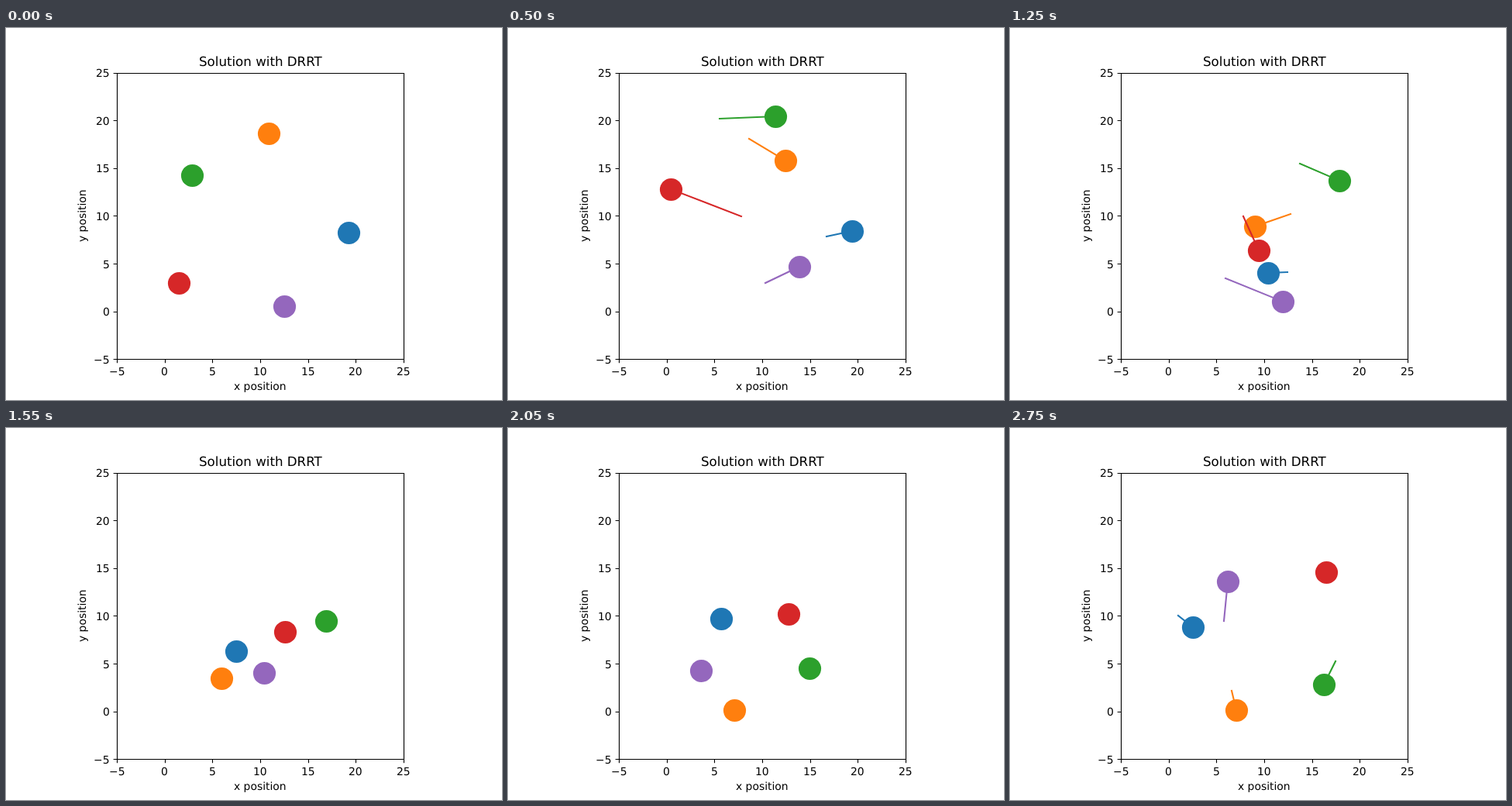
An HTML page that plays this animation: 640x480 px, repeating every 2800 ms.

```html
<!DOCTYPE html>
<html lang="en">
<head>
<meta charset="utf-8">
<title>Planned paths</title>
<style>
  html, body { margin: 0; width: 100%; height: 100%; overflow: hidden; background: #fff; }
  svg { display: block; }
  text { font-family: "DejaVu Sans", sans-serif; text-rendering: geometricPrecision; }
  .axes { fill: none; stroke: #000; stroke-width: 1.11; }
  .trail { stroke-width: 2.08; stroke-linecap: square; }
</style>
</head>
<body>
<svg id="stage" width="640" height="480" viewBox="0 0 640 480"></svg>
<script>
const STEP = 250, TRAIL = 50, LOOP = 2800;
const PT = 100 / 72, UNIT = 12.32;
const stage = document.getElementById('stage');

function set(el, attrs) {
  for (const key in attrs) el.setAttribute(key, attrs[key]);
  return el;
}

function add(tag, attrs) {
  return stage.appendChild(set(document.createElementNS(stage.namespaceURI, tag), attrs));
}

// Text starts on a whole pixel; align is 0.5 for centred, 1 for right
function label(text, x, y, { align = 0.5, size = 10, turn = 0 } = {}) {
  const el = add('text', { 'font-size': size * PT });
  el.textContent = text;
  const shift = align * el.getComputedTextLength();
  const [left, base] = turn ? [x, y + shift] : [x - shift, y];
  set(el, { transform: `translate(${Math.round(left)} ${Math.round(base)}) rotate(${turn})` });
}

// Key points of each robot, one per step; "-" lies halfway between its neighbours
const routes = {
  '#1f77b4': '442,264 411,269 444,262 385,252 358,315 333,316 297,288 - 275,246 281,198 217,242 236,257',
  '#ff7f0e': '339,136 311,143 358,171 344,206 362,240 316,256 278,323 286,371 292,364 292,364 286,339 292,364',
  '#2ca02c': '240,190 273,117 345,114 362,169 374,175 425,197 413,249 469,280 389,310 393,306 420,301 405,331',
  '#d62728': '223,329 301,243 210,208 298,144 301,243 321,287 360,263 - 362,240 - 402,192 408,186',
  '#9467bd': '359,359 332,329 376,308 389,310 278,323 352,353 333,316 - 249,313 - 276,249 281,198'
};

function parseRoute(route) {
  const keys = route.split(' ').map(key => key.split(',').map(Number));
  return keys.map((p, i) => p.length > 1 ? p
    : [0, 1].map(axis => Math.round((keys[i - 1][axis] + keys[i + 1][axis]) / 2)));
}

const robots = Object.entries(routes).map(([color, route]) => ({
  points: parseRoute(route),
  trail: add('line', { class: 'trail', stroke: color }),
  disc: add('circle', { r: 14.58, fill: color })
}));

// Axes, with ticks snapped to whole pixels
const snap = v => Math.round(v) + 0.5;
let axes = 'M143.5 58.5H513.5V427.5H143.5Z';
for (let v = -5; v <= 25; v += 5) {
  const x = 204.8 + UNIT * v, y = 365.6 - UNIT * v;
  const text = String(v).replace('-', '\u2212');
  axes += `M${snap(x)} 427.5v4.86M143.5 ${snap(y)}h-4.86`;
  label(text, x, 448);
  label(text, 133.5, y + 5.6, { align: 1 });
}
add('path', { class: 'axes', d: axes });
label('Solution with DRRT', 328, 49, { size: 12 });
label('x position', 328, 467);
label('y position', 103, 242.4, { turn: -90 });

function draw(now) {
  const t = now % LOOP, i = Math.floor(t / STEP);
  const visibility = i > 0 && t % STEP < TRAIL ? 'visible' : 'hidden';
  for (const { points, trail, disc } of robots) {
    const [x, y] = points[i], [px, py] = points[Math.max(i - 1, 0)];
    set(disc, { cx: x + 0.5, cy: y + 0.5 });
    set(trail, { x1: px, y1: py, x2: x, y2: y, visibility });
  }
}

const start = performance.now();
function tick() {
  draw(performance.now() - start);
  requestAnimationFrame(tick);
}
tick();
</script>
</body>
</html>
```
